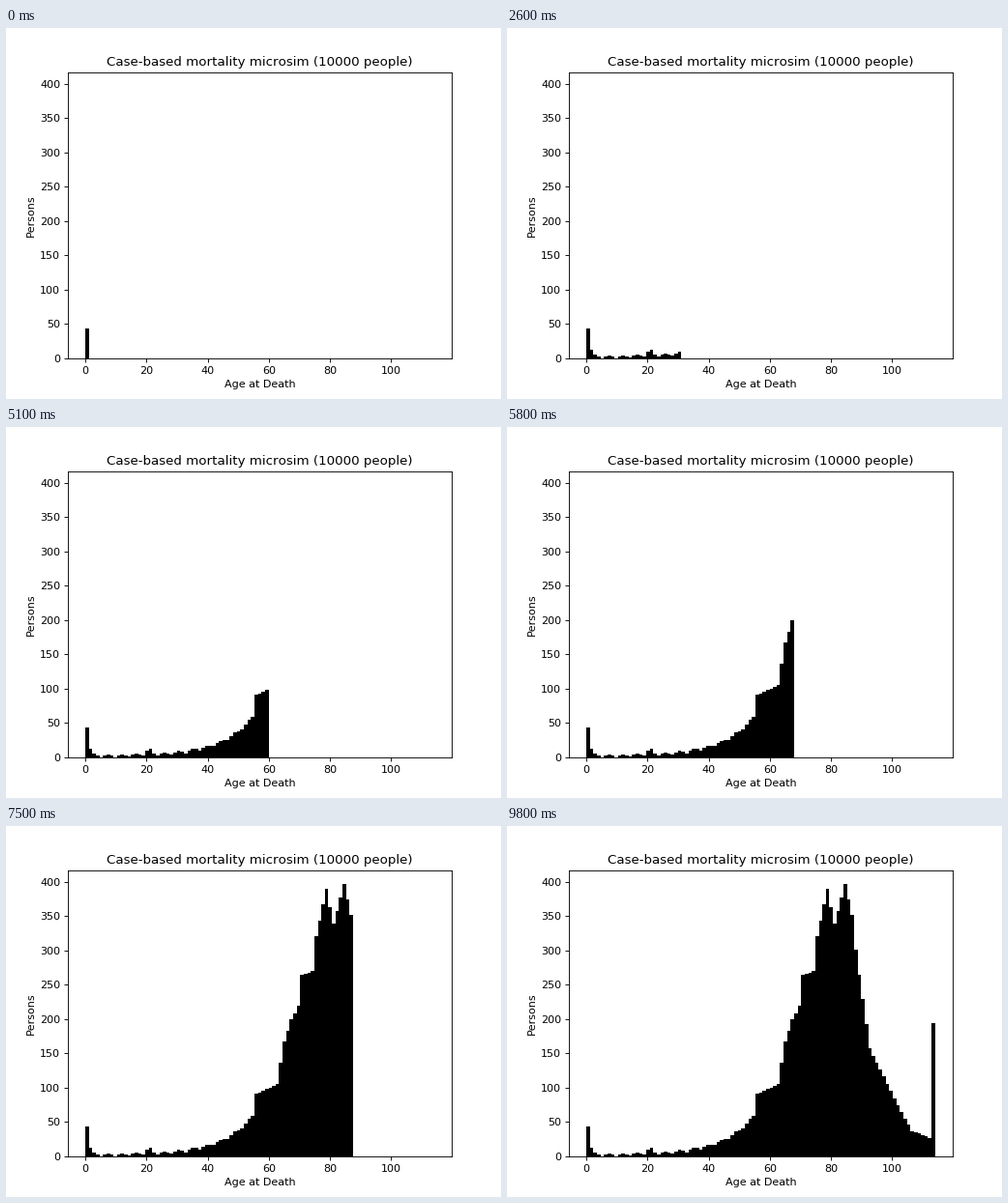
Write a matplotlib script that moves like this. It is 512 by 384 pixels and loops after 9900 ms.

```python
import numpy as np
import matplotlib.pyplot as plt
from matplotlib.animation import FuncAnimation

PEOPLE = 10000
MAX_AGE = 114
BINS = 99
OLD = 48  # first bin of the old-age hump

# turning points of the old-age hump: (bin, deaths)
HUMP = [(48, 91), (54, 105), (56, 167), (58, 200), (60, 219), (61, 264),
        (64, 270), (65, 321), (68, 390), (70, 339), (73, 397), (75, 352),
        (76, 301), (80, 157), (85, 106), (88, 74), (92, 37), (97, 27),
        (98, 194)]


def death_counts():
    k = np.arange(BINS)
    infant = 43 * np.exp(-1.5 * k)
    ripple = 4 * np.abs(np.sin(np.pi * k / 4))
    accidents = 7 * np.exp(-((k - 17.5) / 1.2) ** 2)
    ageing = 6 * np.exp(0.112 * (k - 27))
    young = infant + ripple + accidents + ageing
    old = np.interp(k, *zip(*HUMP))
    return np.floor(np.where(k < OLD, young, old))


# kerning in whole pixels
plt.rcParams.update({"font.family": "DejaVu Sans", "text.kerning_factor": 6})

deaths = death_counts()
edges = np.linspace(0, MAX_AGE, BINS + 1)

fig, ax = plt.subplots(figsize=(6.4, 4.8), dpi=80)
bars = ax.bar(edges[:-1], deaths, width=np.diff(edges), align="edge",
              color="black", linewidth=0)
ax.set_xlim(-0.05 * MAX_AGE, 1.05 * MAX_AGE)
ax.set_ylim(0, 1.05 * deaths.max())
ax.set_xticks(range(0, 101, 20))
ax.set_yticks(range(0, 401, 50))
ax.set_title(f"Case-based mortality microsim ({PEOPLE} people)")
ax.set_xlabel("Age at Death")
ax.set_ylabel("Persons")


def update(step):
    for i, bar in enumerate(bars):
        bar.set_visible(i <= step)
    return list(bars)


anim = FuncAnimation(fig, update, frames=BINS, interval=100,
                     repeat=True, repeat_delay=0, blit=False)
plt.show()
```
